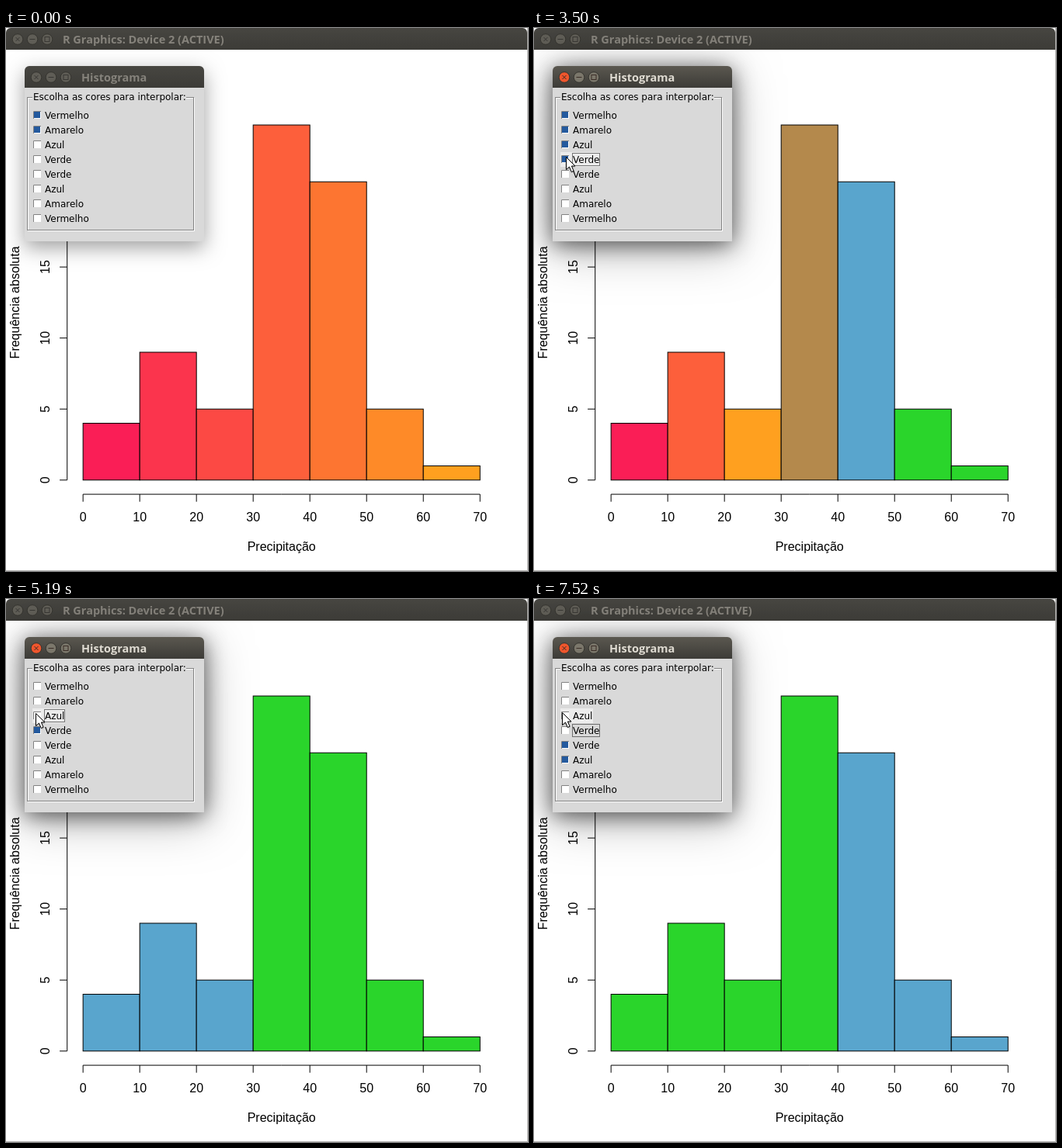
Animation, 672 px wide and 700 px high, one loop 7540 ms. Source, as an HTML page with a canvas:

```html
<!DOCTYPE html>
<html lang="pt">
<head>
<meta charset="utf-8">
<title>Histograma</title>
<style>
html, body { margin: 0; width: 100%; height: 100%; overflow: hidden; background: #fff; }
canvas { display: block; }
</style>
</head>
<body>
<canvas id="stage" width="672" height="700"></canvas>
<script>
const c = document.getElementById('stage').getContext('2d');
const LOOP = 7540, ACTIVE_AT = 2060, REDRAW_DELAY = 60, STEP = 50;
const COUNTS = [4, 9, 5, 25, 21, 5, 1];
const HUES = ['Vermelho', 'Amarelo', 'Azul', 'Verde'];
const LABELS = [...HUES, ...[...HUES].reverse()];
const ROW_TOP = 103, ROW_H = 19;

// pointer legs: start, duration, end x, end y, click time (if any)
const LEGS = [
  [800, 700, 29, 117],
  [1530, 150, 36, 139],
  [1680, 150, 39, 149, 2110],
  [2480, 350, 41, 167, 2940],
  [3450, 550, 37, 109, 4180],
  [4270, 200, 38, 127, 4610],
  [4680, 350, 38, 147, 5190],
  [5270, 550, 38, 205, 6040],
  [6320, 500, 39, 186, 6980],
  [7030, 200, 39, 166, 7280],
  [7320, 200, 36, 146]
];

const AXIS = '16px "Liberation Sans", sans-serif';
const LABEL = '12px "DejaVu Sans", sans-serif';
const TITLE = 'bold 14.5px "Open Sans", sans-serif';

const lerp = (a, b, u) => a + (b - a) * u;
const smooth = u => u * u * (3 - 2 * u);
const rowAt = y => Math.floor((y - ROW_TOP) / ROW_H);

function rect(x, y, w, h, color) {
  c.fillStyle = color;
  c.fillRect(x, y, w, h);
}

function frame(x, y, w, h, color) {
  c.strokeStyle = color;
  c.strokeRect(x, y, w, h);
}

function line(color, ...p) {
  c.strokeStyle = color;
  c.beginPath();
  for (let i = 0; i < p.length; i += 2) c.lineTo(p[i], p[i + 1]);
  c.stroke();
}

function text(s, x, y, font, color, align = 'left') {
  c.font = font;
  c.fillStyle = color;
  c.textAlign = align;
  c.fillText(s, x, y);
}

function vertical(s, x, y) {
  c.save();
  c.translate(x, y);
  c.rotate(-Math.PI / 2);
  text(s, 0, 0, AXIS, '#000', 'center');
  c.restore();
}

function button(x, y, kind, fill, ink) {
  c.beginPath();
  c.arc(x, y, 6.8, 0, 7);
  c.fillStyle = fill;
  c.fill();
  c.strokeStyle = '#35342f';
  c.stroke();
  if (kind === 0) {
    line(ink, x - 2.5, y - 2.5, x + 2.5, y + 2.5);
    line(ink, x + 2.5, y - 2.5, x - 2.5, y + 2.5);
  } else if (kind === 1) {
    line(ink, x - 3.5, y, x + 3.5, y);
  } else {
    frame(x - 3, y - 3, 6, 6, ink);
  }
}

function windowShape(x, y, w, h, fill) {
  c.fillStyle = fill;
  c.beginPath();
  c.roundRect(x, y, w, h, [6, 6, 0, 0]);
  c.fill();
}

function titleBar(x, y, w, title, active) {
  const g = c.createLinearGradient(0, y, 0, y + 28);
  g.addColorStop(0, active ? '#5b5850' : '#474641');
  g.addColorStop(1, '#3c3b37');
  windowShape(x, y, w, 28, g);
  for (let i = 0; i < 3; i++) {
    const fill = !active ? '#5f5d56' : i ? '#7b776b' : '#f0562d';
    button(x + 15 + 19 * i, y + 14.5, i, fill, active ? '#3a2d27' : '#383733');
  }
  text(title, x + 73, y + 20, TITLE, active ? '#dfdbd2' : '#85827b');
}

// Scale 0..3 runs red, yellow, blue, green: smooth in the warm part, flat after it.
function scaleColor(v) {
  if (v <= 1) return `rgb(${lerp(250, 255, v)},${lerp(30, 160, v)},${lerp(86, 31, v)})`;
  return v < 1.6 ? '#b4894c' : v < 2.5 ? '#59a5cd' : '#2ad52b';
}

function barColors(checked) {
  const stops = checked.flatMap((on, i) => on ? HUES.indexOf(LABELS[i]) : []);
  return COUNTS.map((n, i) => {
    const p = i * (stops.length - 1) / 6, k = Math.floor(p);
    return scaleColor(lerp(stops[k], stops[k + 1] ?? stops[k], p - k));
  });
}

function plot(colors) {
  const left = 99.16, step = 73.01, base = 582.77, unit = 18.31, axisX = 78.72, axisY = 601.08, tick = 9.6;
  COUNTS.forEach((n, i) => {
    const x = left + step * i, h = n * unit;
    rect(x, base - h, step, h, colors[i]);
    frame(x, base - h, step, h, '#000');
  });
  line('#000', left, axisY, left + 7 * step, axisY);
  for (let i = 0; i < 8; i++) {
    const x = left + step * i;
    line('#000', x, axisY, x, axisY + tick);
    text(10 * i, x, 636, AXIS, '#000', 'center');
  }
  line('#000', axisX, base, axisX, base - 25 * unit);
  for (let n = 0; n <= 25; n += 5) {
    const y = base - n * unit;
    line('#000', axisX - tick, y, axisX, y);
    vertical(n, 56, y);
  }
  text('Precipitação', 354.7, 674, AXIS, '#000', 'center');
  vertical('Frequência absoluta', 17, 353.9);
}

function shadow(blur, dy, alpha) {
  c.save();
  c.shadowColor = `rgba(0,0,0,${alpha})`;
  c.shadowBlur = blur;
  c.shadowOffsetY = dy;
  windowShape(24, 49, 231, 226, '#d9d9d9');
  c.restore();
}

function dialog(active, checked, focus, hover) {
  if (active) {
    shadow(60, 10, .3);
    shadow(28, 4, .6);
  } else {
    shadow(26, 8, .38);
  }
  titleBar(24, 49, 231, 'Histograma', active);
  frame(28.5, 90.5, 214, 171, '#fff');
  frame(27.5, 89.5, 214, 171, '#828282');
  rect(34, 80, 198, 18, '#d9d9d9');
  text('Escolha as cores para interpolar:', 35, 93, LABEL, '#000');

  LABELS.forEach((s, i) => {
    const y = ROW_TOP + ROW_H * i;
    c.font = LABEL;
    const w = Math.round(c.measureText(s).width);
    if (i === hover) rect(34, y, w + 17, ROW_H, '#ececec');
    rect(35, y + 4, 10, 10, '#fff');
    line('#828282', 35.5, y + 14, 35.5, y + 4.5, 45, y + 4.5);
    if (checked[i]) rect(36, y + 5, 8, 8, '#245a9e');
    text(s, 50, y + 14, LABEL, '#000');
    if (i === focus) {
      c.setLineDash([1, 1]);
      frame(49.5, y + 1.5, w + 1, 16, '#000');
      c.setLineDash([]);
    }
  });
}

// The pointer advances in small steps; its first leg sweeps over an arc.
function pointerAt(t) {
  let x = 655, y = 149;
  LEGS.forEach(([start, span, x1, y1], i) => {
    if (t < start) return;
    const raw = Math.min(1, Math.floor((t - start) / STEP) * STEP / span), u = smooth(raw);
    x = lerp(x, x1, u);
    y = lerp(y, y1, u) - (i ? 0 : 68 * Math.sin(Math.PI * u));
  });
  return [Math.round(x), Math.round(y)];
}

function hoverAt(x, y) {
  const i = rowAt(y);
  if (x < 34 || !LABELS[i]) return -1;
  c.font = LABEL;
  return x < 51 + c.measureText(LABELS[i]).width ? i : -1;
}

function pointer(x, y) {
  c.save();
  c.translate(x + .5, y + .5);
  c.shadowColor = 'rgba(0,0,0,.35)';
  c.shadowBlur = 2;
  c.shadowOffsetY = 1;
  c.beginPath();
  [[0, 0], [0, 16], [4, 12.5], [6.8, 19], [9.6, 17.8], [6.9, 11.5], [11.5, 11.5]].forEach(p => c.lineTo(...p));
  c.closePath();
  c.fillStyle = '#fff';
  c.fill();
  c.shadowColor = 'transparent';
  c.strokeStyle = '#000';
  c.stroke();
  c.restore();
}

function boxesAt(t) {
  const checked = LABELS.map((s, i) => i < 2);
  let focus = -1;
  for (const [, , , y, click] of LEGS) {
    if (t < click || !click) continue;
    focus = rowAt(y);
    checked[focus] = !checked[focus];
  }
  return { checked, focus };
}

function draw(t) {
  const { checked, focus } = boxesAt(t), [x, y] = pointerAt(t), visible = t >= LEGS[0][0];
  c.lineWidth = 1;
  rect(0, 0, 672, 700, '#fff');
  titleBar(0, 0, 671, 'R Graphics: Device 2 (ACTIVE)', false);
  line('#b5b4b2', 671.5, 0, 671.5, 699.5, 0, 699.5);
  plot(barColors(boxesAt(t - REDRAW_DELAY).checked));
  dialog(t >= ACTIVE_AT, checked, focus, visible ? hoverAt(x, y) : -1);
  if (visible) pointer(x, y);
}

const start = performance.now();
function tick() {
  draw((performance.now() - start) % LOOP);
  requestAnimationFrame(tick);
}
tick();
</script>
</body>
</html>
```
